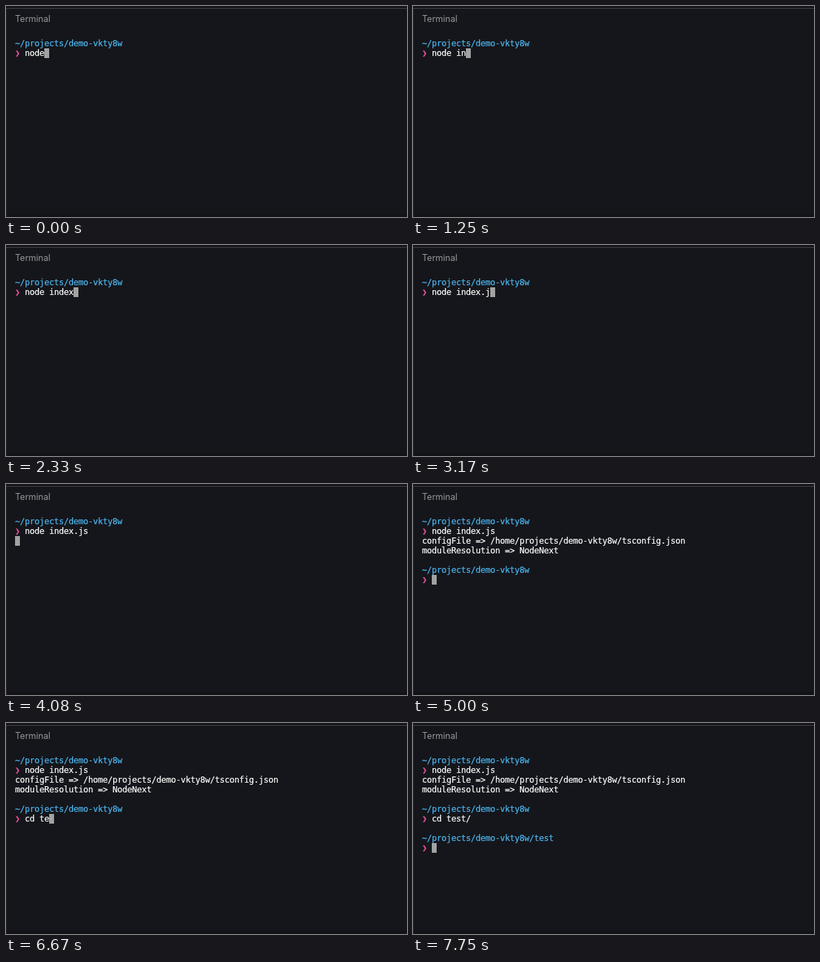
These frames come from a looping animation (576x304 px, 8000 ms). An HTML page:

```html
<!DOCTYPE html>
<html lang="en">
<head>
<meta charset="utf-8">
<title>Terminal</title>
<style>
  html, body { margin: 0; width: 100%; height: 100%; overflow: hidden; background: #15161b; }
  svg { display: block; width: 576px; height: 304px; }
  .title { font: 12.5px Inter, "Liberation Sans", sans-serif; fill: #97989b; }
  .row { font: 12px "DejaVu Sans Mono", "Liberation Mono", monospace; white-space: pre;
         fill: #fff; stroke: #fff; stroke-width: .2; }
  .path { fill: #4db8f2; stroke: #4db8f2; }
  .mark { fill: #e8509f; stroke: #e8509f; }
</style>
</head>
<body>
<svg viewBox="0 0 576 304">
  <rect width="576" height="304" fill="#15161b"/>
  <rect y="300" width="576" height="4" fill="#121317"/>
  <rect y="3" width="1" height="301" fill="#26272c"/>
  <rect y="3" width="576" height="1" fill="#414246"/>
  <text class="title" x="13" y="23">Terminal</text>
  <rect id="cursor" width="7" height="14" fill="#a2a2a2"/>
  <g id="screen"></g>
</svg>
<script>
const LOOP = 8000;
const LEFT = 13, TOP = 47, CELL_W = 7, CELL_H = 14, ASCENT = 11;
const NS = "http://www.w3.org/2000/svg";
const PROJECT = "demo-vkty8w";
const prompt = dir => `~/projects/${PROJECT}${dir}\n❯ `;

// Each entry appends its text to the terminal at the given time.
const script = [
  [0, prompt("") + "node"],
  [420, " "],
  [1000, "i"],
  [1170, "n"],
  [1580, "d"],
  [1920, "e"],
  [2250, "x"],
  [2580, "."],
  [3170, "j"],
  [3330, "s"],
  [3920, "\n"],
  [4170, `configFile => /home/projects/${PROJECT}/tsconfig.json\nmoduleResolution => NodeNext\n`],
  [4250, "\n" + prompt("")],
  [5500, "c"],
  [5750, "d"],
  [6000, " "],
  [6670, "te"],
  [7000, "s"],
  [7080, "t/"],
  [7580, "\n"],
  [7670, "\n" + prompt("/test")]
];

const screen = document.getElementById("screen");
const cursor = document.getElementById("cursor");
let shown = null;

function addText(text, col, row, kind = "") {
  const el = document.createElementNS(NS, "text");
  el.setAttribute("class", "row " + kind);
  el.setAttribute("x", [...text].map((_, i) => LEFT + (col + i) * CELL_W).join(" "));
  el.setAttribute("y", TOP + row * CELL_H + ASCENT);
  el.textContent = text;
  screen.append(el);
}

function addLine(line, row) {
  if (line.startsWith("❯")) {
    addText("❯", 0, row, "mark");
    addText(line.slice(2), 2, row);
  } else if (line) {
    addText(line, 0, row, line.startsWith("~") ? "path" : "");
  }
}

function render(time) {
  const content = script.filter(([at]) => at <= time).map(([, text]) => text).join("");
  if (content === shown) return;
  shown = content;
  const lines = content.split("\n");
  screen.replaceChildren();
  lines.forEach(addLine);
  cursor.setAttribute("x", LEFT + lines.at(-1).length * CELL_W);
  cursor.setAttribute("y", TOP + (lines.length - 1) * CELL_H);
}

const start = performance.now();
function tick() {
  render((performance.now() - start) % LOOP);
  requestAnimationFrame(tick);
}
tick();
</script>
</body>
</html>
```
